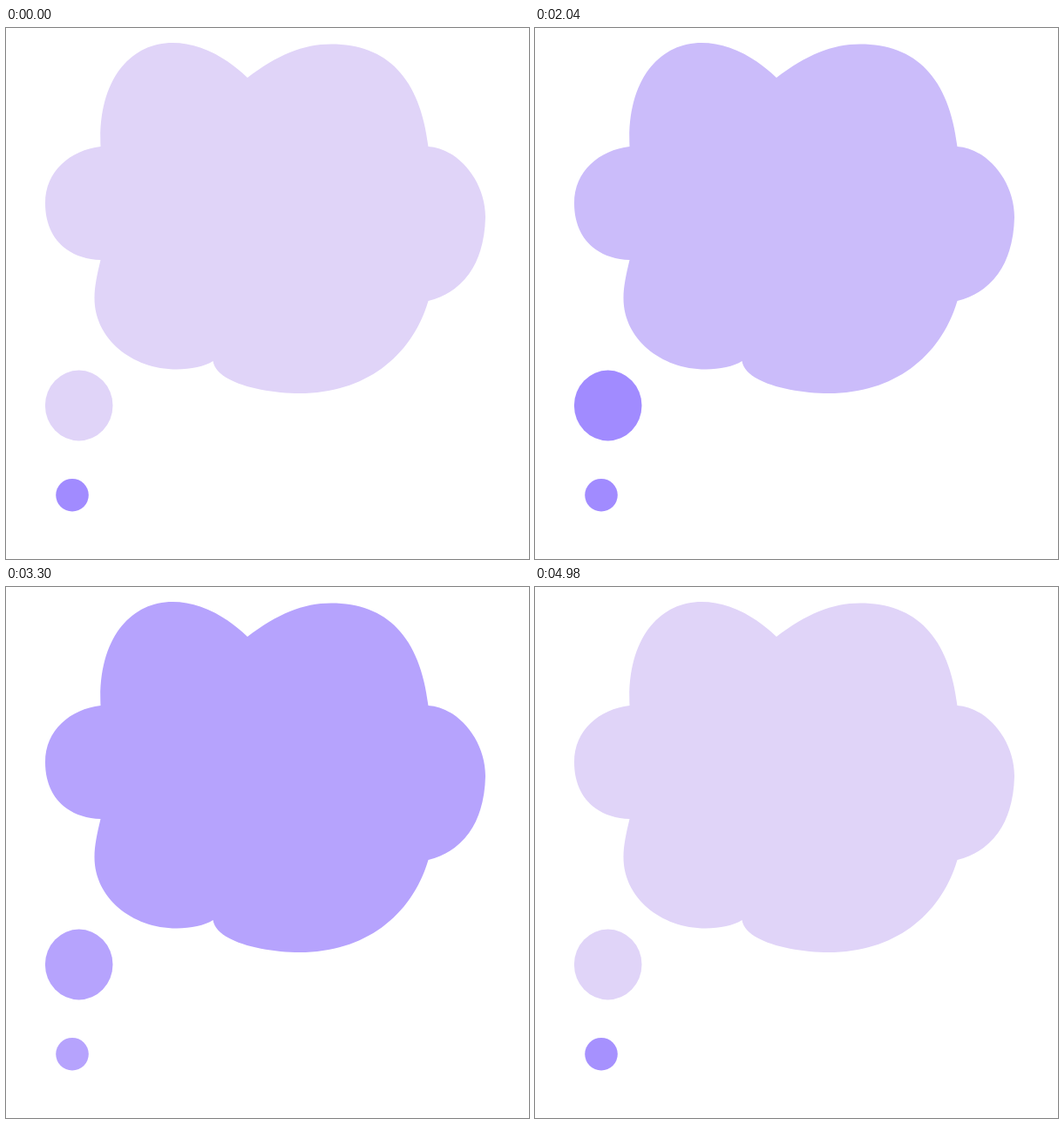
Recreate the animation shown at these times as an HTML page. Size 600 by 609 pixels, loop 5040 ms.

```html
<!DOCTYPE html>
<html lang="en">
<head>
<meta charset="utf-8">
<title>Thought bubble</title>
<style>
  html, body { margin: 0; width: 100%; height: 100%; overflow: hidden; background: #fff; }
  svg { display: block; width: 100%; height: 100%; }
</style>
</head>
<body>
<svg viewBox="0 0 600 609">
  <path id="cloud" d="M108.5 136
    C105 58 144 17 191 17 C220 17 250 31 277 57
    C311 31 341 18.5 373 18.5 C437 18.5 475 57 484.5 136
    C518 138 550 175 550 217 C549 262 531 301 484.5 313
    C465 378 411 419 337 419 C296 419 241 407 237.5 382
    C228 388 212 391.5 196 391.5 C144 391.5 101.5 356 101.5 310
    C101.5 296 104.5 283 108.5 266
    C70 265 45 240 45 201 C45 164 74 140 108.5 136Z"/>
  <ellipse id="big" cx="83.7" cy="433" rx="38.8" ry="40.4"/>
  <circle id="small" cx="76" cy="535.7" r="18.8"/>
</svg>
<script>
const LOOP = 5040, PHASE = 1260, HOLD = 600, STEP = 60, STEPS = 12;
const LIGHT = [224, 212, 248], DARK = [161, 139, 255];
const EVEN = [1, 2, 4, 7, 10, 11, 12], LATE = [1, 2, 4, 7, 8, 11, 12];

// One row per phase: darkness before and after the fade, and the fade steps that show.
const phases = [
  { from: { cloud: 0, big: 0, small: 1 }, to: { cloud: 0, big: 1, small: 1 }, levels: EVEN },
  { from: { cloud: 0, big: 1, small: 1 }, to: { cloud: 1, big: 1, small: 1 }, levels: LATE },
  { from: { cloud: 1, big: 1, small: 1 }, to: { cloud: 0, big: 0, small: 0 }, levels: EVEN },
  { from: { cloud: 0, big: 0, small: 0 }, to: { cloud: 0, big: 0, small: 1 }, levels: EVEN }
];

const parts = ["cloud", "big", "small"].map(id => document.getElementById(id));

const mix = k => `rgb(${LIGHT.map((c, i) => Math.round(c + (DARK[i] - c) * k))})`;

function fade(ms, levels) {
  if (ms < HOLD) return 0;
  const step = Math.floor((ms - HOLD) / STEP) + 1;
  return Math.max(...levels.filter(level => level <= step)) / STEPS;
}

function draw(ms) {
  const t = ms % LOOP;
  const { from, to, levels } = phases[Math.floor(t / PHASE)];
  const k = fade(t % PHASE, levels);
  for (const part of parts) {
    const a = from[part.id], b = to[part.id];
    part.setAttribute("fill", mix(a + (b - a) * k));
  }
}

const start = performance.now();
function tick() {
  draw(performance.now() - start);
  requestAnimationFrame(tick);
}
tick();
</script>
</body>
</html>
```
